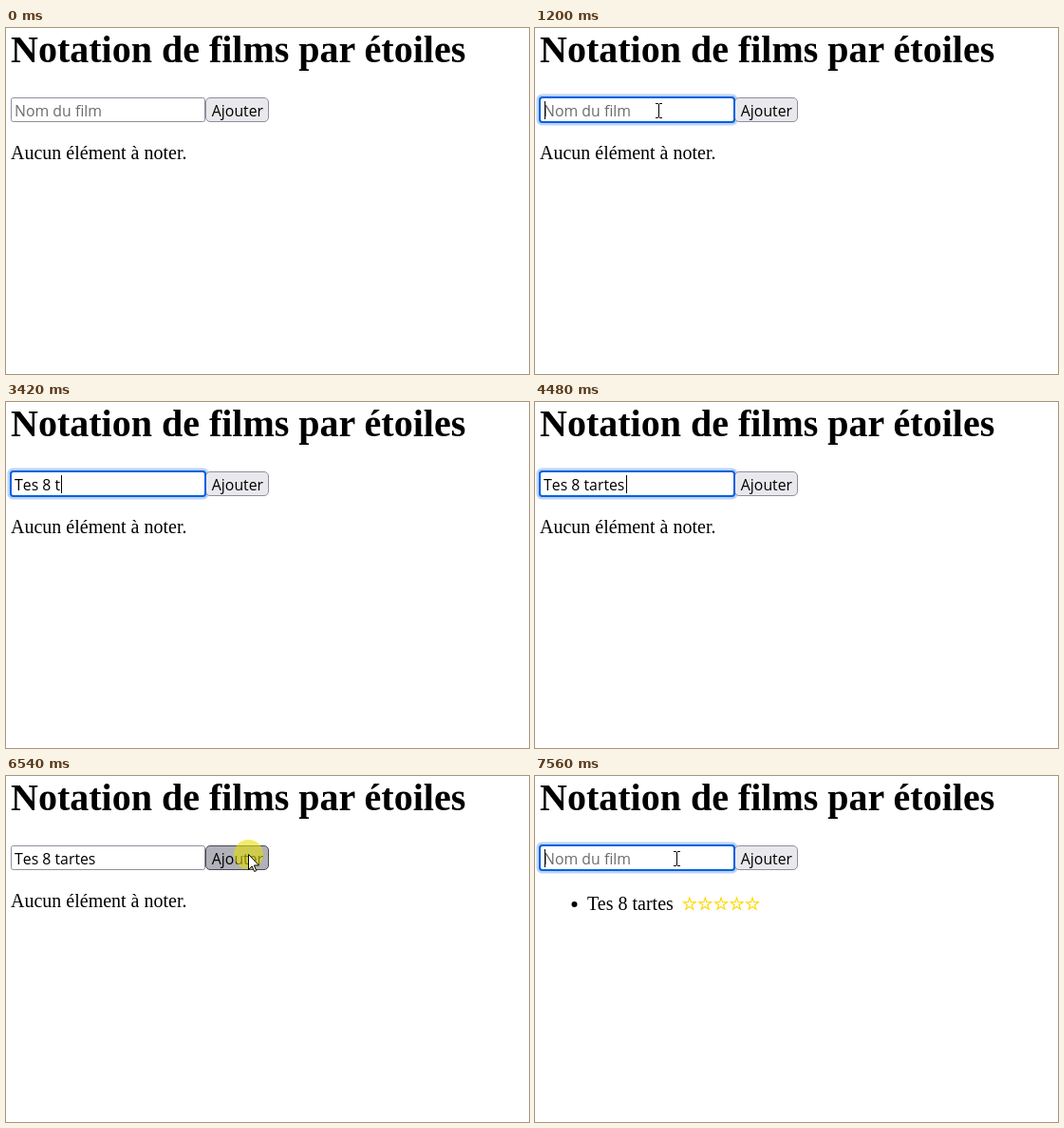
Write an HTML page that moves like this. It is 551x364 px and loops after 8000 ms.

```html
<!DOCTYPE html>
<html lang="fr">
<head>
<meta charset="utf-8">
<title>Notation de films</title>
<style>
  html, body { margin: 0; width: 100%; height: 100%; overflow: hidden; background: #fff; }
  svg { display: block; }
  text { font: 20px "Liberation Serif", serif; white-space: pre; }
  .ui { font: 15.85px "Open Sans", "Noto Sans", sans-serif; font-kerning: none; }
  .title { font-size: 40px; font-weight: bold; }
  .stars { font: 18.5px "DejaVu Sans", sans-serif; fill: gold; stroke: gold; stroke-width: .5; }
</style>
</head>
<body>
<svg width="551" height="364" viewBox="0 0 551 364">
  <text class="title" x="5" y="36">Notation de films par étoiles</text>

  <rect id="halo" x="2.75" y="70.75" width="209.5" height="30.5" rx="4.5" fill="none" stroke="#0061e0" stroke-opacity=".27" stroke-width="2.5"/>
  <rect id="field" x="5.5" y="73.5" width="204" height="25" rx="2" fill="#fff"/>
  <text id="hint" class="ui" x="9" y="93" fill="#6c6c6c">Nom du film</text>
  <text id="typed" class="ui" x="9" y="93"></text>
  <rect id="caret" y="77" width="1" height="19"/>

  <rect id="button" x="210.5" y="73.5" width="66" height="25" rx="4.5"/>
  <text class="ui" x="216.8" y="93">Ajouter</text>
  <rect id="outline" x="5" y="73" width="205" height="26" rx="2.5" fill="none" stroke="#0061e0" stroke-width="2"/>

  <text id="empty" x="5" y="138">Aucun élément à noter.</text>
  <g id="list">
    <circle cx="41.5" cy="135" r="3"/>
    <text id="item" x="55" y="141"></text>
    <text class="stars" x="154.5" y="140.5">☆☆☆☆☆</text>
  </g>

  <g id="pointer">
    <circle id="click" cx=".5" cy=".5" r="15.5" fill="#e6de00" fill-opacity=".58"/>
    <path id="arrow" d="M.5 .5V16.5L4.2 13 6.7 18.5 8.8 17.6 6.4 12H11.5Z" fill="#fff" stroke="#000"/>
    <circle id="busy" cx="14" cy=".5" r="5.8" fill="#fff" stroke="#2a96e0" stroke-width="4"/>
    <path id="beam" d="M-3 -7.5H0M1 -7.5H4M.5 -7V7M-3 7.5H0M1 7.5H4" fill="none" stroke="#000"/>
  </g>
</svg>
<script>
const LOOP = 8000, STEP = 72;
const NAME = "Tes 8 tartes";
const TYPE_START = 1960, KEY_GAP = 229;
const WAKE = 5380, PRESS = 6400, RELEASE = 6670, REFOCUS = 7430;

// Each move follows a quadratic curve, slowing down by the given power.
const MOVES = [
  { start: 130, end: 922, power: 4, points: [[366, 311], [248, 199], [130, 87]] },
  { start: WAKE, end: 5740, power: 1, points: [[131, 80], [155, -75], [288, 122]] },
  { start: 5740, end: 6172, power: 2, points: [[288, 122], [240, 143], [255, 82]] },
  { start: 6940, end: 7372, power: 2, points: [[255, 82], [215, 130], [149, 87]] },
];

const el = id => document.getElementById(id);
const show = (id, on) => el(id).setAttribute("visibility", on ? "visible" : "hidden");
const within = (t, a, b) => t >= a && t < b;

function pointerAt(t) {
  const move = MOVES.findLast(m => t >= m.start);
  if (!move || within(t, TYPE_START, WAKE)) return null;
  const elapsed = Math.floor((t - move.start) / STEP) * STEP;
  const k = Math.min(1, elapsed / (move.end - move.start));
  const u = 1 - (1 - k) ** move.power;
  const [a, b, c] = move.points;
  return [0, 1].map(i =>
    Math.round((1 - u) ** 2 * a[i] + 2 * u * (1 - u) * b[i] + u * u * c[i]));
}

function draw(t) {
  const added = t >= RELEASE;
  const focus = within(t, 1060, PRESS) || t >= REFOCUS;
  const pressed = within(t, PRESS, RELEASE);
  const pos = pointerAt(t);
  const [x, y] = pos || [-99, -99];
  const inRow = y >= 73 && y < 99;
  const overField = inRow && x >= 5 && x < 210;
  const overButton = inRow && x >= 210 && x < 277;
  const keys = Math.floor((t - TYPE_START) / KEY_GAP) + 1;
  const text = added ? "" : NAME.slice(0, Math.max(0, keys));
  const blinkedOff = within(t, 1630, TYPE_START) || within(t, 4850, WAKE) || within(t, 5960, PRESS);

  el("field").setAttribute("stroke", overField ? "#676774" : "#8f8f9d");
  el("button").setAttribute("fill", pressed ? "#b1b1b9" : overButton ? "#d0d0d7" : "#e9e9ed");
  el("button").setAttribute("stroke", pressed ? "#484851" : overButton ? "#676774" : "#8f8f9d");
  show("halo", focus);
  show("outline", focus);

  el("typed").textContent = text;
  show("hint", !text);
  el("caret").setAttribute("x", Math.round(10.3 + (text && el("typed").getComputedTextLength())));
  show("caret", focus && !blinkedOff);

  show("empty", !added);
  show("list", added);
  el("item").textContent = NAME;

  el("pointer").setAttribute("transform", `translate(${x} ${y})`);
  show("click", pressed || within(t, 1060, 1200) || within(t, REFOCUS, 7560));
  show("arrow", pos && !overField);
  show("beam", pos && overField);
  show("busy", pos && !overField && within(t, WAKE, 6172));
}

function frame() {
  draw(performance.now() % LOOP);
  requestAnimationFrame(frame);
}
frame();
</script>
</body>
</html>
```
